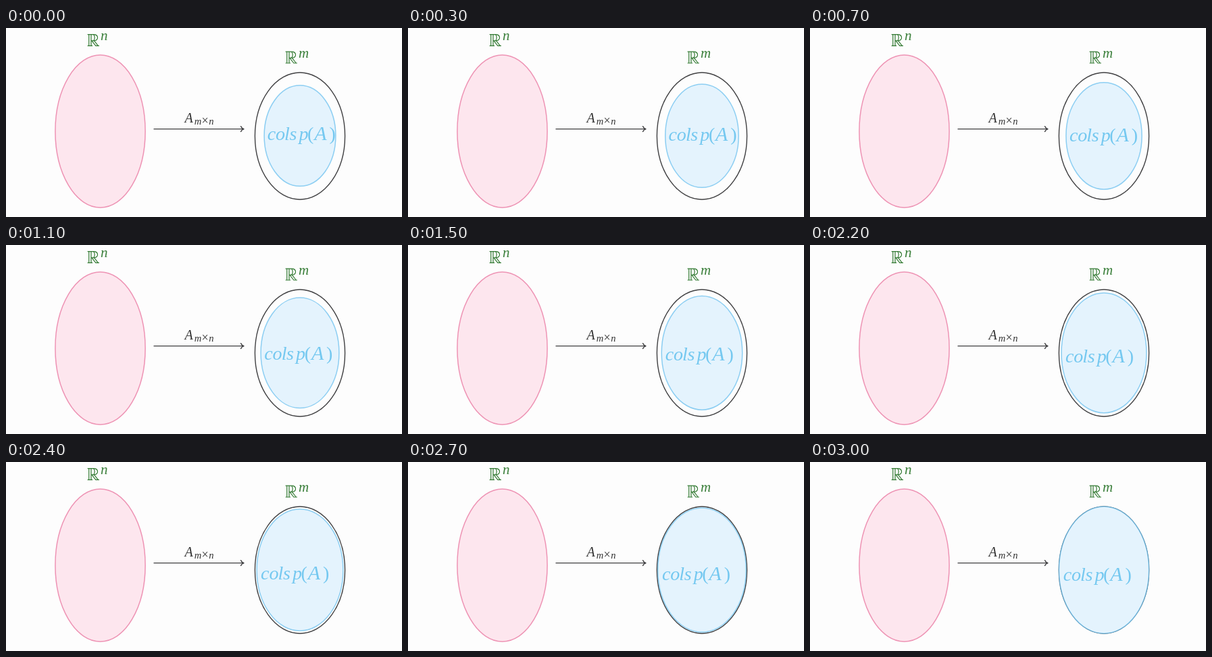
Write an HTML page that moves like this. It is 586 px wide and 280 px high and loops after 3.1 s.

```html
<!DOCTYPE html>
<html lang="en">
<head>
<meta charset="utf-8">
<title>Column space</title>
<style>
  html, body { margin: 0; width: 100%; height: 100%; overflow: hidden; background: #fdfdfd; }
  svg { display: block; }
  text { font-family: "Liberation Serif", serif; font-style: italic; }
  .up { font-style: normal; }
  .line { fill: none; stroke: #3f3f41; stroke-width: 1.4; }
  .sup { font-size: 21px; fill: #3c803c; }
  .map { fill: #333; }
  #label { font-size: 28px; fill: #74c8f0; }
</style>
</head>
<body>
<svg width="586" height="280" viewBox="0 0 586 280">
  <defs>
    <g id="real" fill="none" stroke="#337a33" stroke-width="1.2">
      <path d="M.3 .6H9.2C13.2 .6 15.2 2.6 15.2 5.2S13.2 9.6 9.6 9.8H5.7"/>
      <path d="M.3 17.4H7.8M2.4 .6V17.4M5.7 .6V17.4"/>
      <path d="M9.3 .8C11.4 2.4 11.4 8 9.3 9.7"/>
      <path d="M6.6 9.8L12.5 17.4H17.6M10 9.7L16 17.4"/>
    </g>
  </defs>

  <ellipse cx="139.5" cy="153" rx="66.6" ry="113" fill="#fde6ee" stroke="#ee93b4" stroke-width="1.5"/>
  <use href="#real" x="120.3" y="9"/>
  <text class="sup" x="140" y="18">n</text>

  <text class="map" x="264.5" y="140" font-size="20">A</text>
  <text class="map" x="278.7 289.5 300.2" y="143" font-size="14.5">m<tspan class="up" font-size="18">×</tspan>n</text>
  <path class="line" d="M218.5 149.6H352M347.3 145.2Q348.8 148.8 352.3 149.6Q348.8 150.4 347.3 154"/>

  <ellipse class="line" cx="435" cy="160" rx="66.6" ry="94"/>
  <use href="#real" x="413.3" y="34.6"/>
  <text class="sup" x="433" y="44">m</text>

  <ellipse id="span" cx="435" fill="#e4f3fd" stroke="#62bdee" stroke-opacity=".7" stroke-width="1.5"/>
  <text id="label" x="0 12.3 25.4 32.8 46.8 59.4 69.6 91.8">colsp<tspan class="up">(</tspan><tspan font-size="30">A</tspan><tspan class="up">)</tspan></text>
</svg>
<script>
  const STEP = 100, STEPS = 31;
  const span = document.getElementById('span');
  const label = document.getElementById('label');
  const mix = (a, b, p) => a + (b - a) * p;
  const start = performance.now();

  function draw(now) {
    const step = Math.floor(Math.max(0, now - start) / STEP) % STEPS;
    const p = step / (STEPS - 1);
    span.setAttribute('cy', mix(159.7, 160, p));
    span.setAttribute('rx', mix(52.9, 66.6, p));
    span.setAttribute('ry', mix(74.6, 94, p));
    label.setAttribute('transform', `translate(${mix(386.7, 374.7, p)} ${mix(166, 176.3, p)})`);
    requestAnimationFrame(draw);
  }
  draw(start);
</script>
</body>
</html>
```
